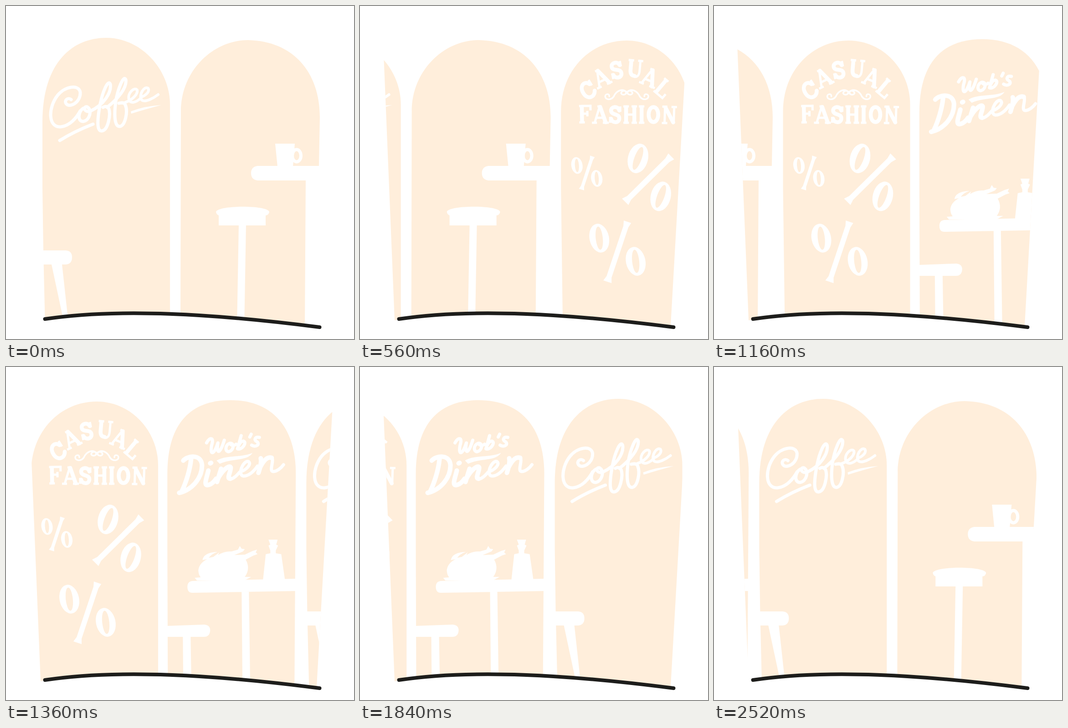
Recreate the animation shown at these times as an HTML page. Size 764x733 px, loop 2560 ms.

```html
<!DOCTYPE html>
<html lang="en">
<head>
<meta charset="utf-8">
<title>Shop windows</title>
<style>
html, body { margin: 0; width: 100%; height: 100%; overflow: hidden; background: #fff; }
svg { display: block; width: 764px; height: 733px; }
.pane { fill: #ffeedb; }
.white { fill: #fff; }
.ink { fill: none; stroke: #fff; stroke-width: 7; stroke-linecap: round; stroke-linejoin: round; }
.ink.bold { stroke-width: 10; }
.ink.heavy { stroke-width: 8.5px; }
.ink.fine { stroke-width: 5px; stroke-linecap: butt; stroke-linejoin: miter; }
</style>
</head>
<body>
<svg viewBox="0 0 764 733">
  <defs>
    <clipPath id="view">
      <path d="M50 60L76 692L85 689C245 665 455 677 688 707L682 704L718.500 60Z"/>
    </clipPath>
    <g id="street">
      <g id="cafe">
        <path class="pane" d="M86 710L82 540L80 400V255C80 122 148 70 220 70C297 70 360 140 360 217V710Z"/>
        <path class="white" d="M78 538H131Q145 539 145 553Q145 568 131 569H78Z M100 569H123L136 688Q132 694 126 691Z"/>
        <g class="ink" role="img" aria-label="Coffee">
          <path d="M143 206C136 200 127 208 132 215C139 225 164 213 163 190C160 172 130 176 113 197C92 224 92 268 120 266C140 264 155 246 163 231"/>
          <path d="M170 225C158 232 156 255 170 254C184 252 190 228 178 222C170 220 170 234 184 232C215 218 232 190 229 172C224 160 212 190 207 215C201 245 198 276 210 275C224 274 230 240 226 227C222 218 215 222 213 223"/>
          <path d="M222 223C245 205 266 180 263 162C258 150 245 185 241 210C237 240 238 266 250 265C262 263 268 232 262 218C260 210 250 214 248 214"/>
          <path stroke-width="6" d="M262 212C275 208 290 195 288 185C282 177 266 192 270 206C274 218 290 210 298 200C308 196 316 188 312 181C304 175 290 196 298 207C306 213 325 202 334 195"/>
          <path d="M118 296Q150 276 191 260"/>
        </g>
        <path class="white" d="M274 232Q305 220 341 218Q310 226 275 237Z"/>
      </g>

      <g id="bar">
        <path class="pane" d="M383 710L384 232C384 142 455 75 531 75C630 77 689 145 689 245L687 352L658 384L656 710Z"/>
        <path class="white" d="M552 352H692V384H552Q538 382 538 368Q538 354 552 352Z M591 303H634L630 353H596Z"/>
        <ellipse class="ink" cx="638" cy="329.500" rx="9.500" ry="13.500"/>
        <path class="white" d="M461 453C466 438 574 438 578 453Q577 460 570 461V483H467V461Q462 459 461 453Z M511 480H527L523 710H507Z"/>
      </g>

      <g id="fashion" transform="translate(405.600)">
        <path class="pane" d="M310 710L306 400V232C306 140 372 76 450 76C525 76 585 140 585 217V710Z"/>
        <g id="sign" role="img" aria-label="Casual fashion"></g>
        <path id="curl" class="ink" style="stroke-width:3.5px" d="M412 199C413 192 403 193 403 199C404 208 417 207 422 199C428 185 442 182 448 188C453 195 440 198 438 192C440 184 450 186 453 193"/>
        <use href="#curl" transform="matrix(-1 0 0 1 901 0)"/>
        <g id="percents"></g>
      </g>

      <g id="diner" transform="translate(733.900)">
        <path class="pane" d="M278 710L277 400V235C277 122 330 73 415 73C505 73 559 130 559 235L556 710Z"/>
        <g class="ink" role="img" aria-label="Wob's Diner">
          <path d="M363 167C371 152 380 156 374 173C370 196 380 193 388 167C384 192 392 194 402 161"/>
          <path d="M414 168C402 172 404 189 413 186C424 182 424 166 414 168Q420 176 428 170"/>
          <path d="M439 151L431 180C440 184 453 166 444 163Q438 163 434 172"/>
          <path d="M461 148L458 154M479 155C470 153 466 160 473 164C482 170 471 178 462 172"/>
          <path class="ink bold" d="M312 206C320 196 350 190 353 215C354 245 330 271 303 277M329 203C327 225 318 255 308 275"/>
          <path class="ink bold" d="M367 228C364 242 356 260 365 260C374 259 380 252 384 246M371 212L373 211"/>
          <path class="ink bold" d="M395 224L386 253M388 246C396 230 412 214 416 221C417 230 406 246 415 246"/>
          <path d="M415 247C424 245 430 238 436 231C450 227 463 214 455 208C443 205 430 238 444 240C457 240 468 228 475 218"/>
          <path class="ink bold" d="M482 201C485 210 480 222 477 233M480 222C487 208 496 196 506 200"/>
          <path d="M507 200C511 208 500 229 509 230C518 230 527 222 532 215"/>
        </g>
        <path class="white" d="M385 206C405 193 440 200 464 189C452 208 420 200 392 213Z"/>
        <path class="white" d="M332 471L562 466V493L332 497Q321 497 321 484Q321 472 332 471Z M440 494H456L459 710H442Z M275 570L358 567Q371 568 371 580Q370 594 357 594H275Z M311 592H328L330 710H312Z"/>
        <path class="white" d="M337 464L350 463Q345 456 345 447Q347 432 364 423L354 425Q357 408 387 407Q373 412 368 420L378 418Q386 412 391 408L388 414Q402 405 418 406L432 402L436 394L440 400L447 401L443 406L424 414L447 413L464 405L474 402L471 408L475 412L466 415L449 424Q460 444 447 462L461 462L446 470H342Z"/>
        <path class="white" d="M499 380H519L516 391L520 393L515 404V410L527 412L535 468H487L493 412L503 410V404L499 393L503 391Z"/>
      </g>
    </g>
  </defs>

  <g clip-path="url(#view)">
    <g id="belt">
      <use href="#street"/>
      <use href="#street" x="1236"/>
    </g>
  </g>
  <path d="M85.500 689C245 665 455 677 688.500 707" fill="none" stroke="#1d1d1b" stroke-width="8" stroke-linecap="round"/>
</svg>
<script>
const LOOP = 2560, STEP = 40, PERIOD = 1236;
const byId = id => document.getElementById(id);

// Slab letters centred on 0,0: heavy strokes, then fine strokes
const glyphs = {
  A: ['M0 -17L12 17', 'M-1 -18L-12 18M-9 7H9M-18 18H-7M6 18H19M-6 -18H3'],
  C: ['M10 -9C5 -22 -12 -18 -12 1C-12 20 6 21 12 9', 'M13 -18V-4'],
  F: ['M-7 -16V16', 'M-13 -18H12V-8M-7 -1H6M5 -7V5M-13 18H-1'],
  H: ['M-9 -16V16M9 -16V16', 'M-15 -18H-3M3 -18H15M-15 18H-3M3 18H15M-9 0H9'],
  I: ['M0 -16V16', 'M-6 -18H6M-6 18H6'],
  L: ['M-7 -16V16', 'M-13 -18H-1M-13 18H12V7'],
  N: ['M-9 -16L9 16', 'M-10 -18V18M10 -18V18M-16 -18H-5M4 -18H16M-16 18H-4'],
  O: ['M0 -16.500C-14 -16 -14 16 0 16.500C14 16 14 -16 0 -16.500', ''],
  S: ['M9 -9C6 -20 -9 -18 -9 -9C-9 2 9 -3 9 8C9 20 -7 19 -9 9', 'M11 -18V-6M-11 5V18'],
  U: ['M-10 -16V3C-10 13 -6 16 0 16', 'M0 18C8 18 10 12 10 3V-18M-16 -18H-4M5 -18H16']
};

function letter(char, x, y, angle) {
  const [heavy, fine] = glyphs[char];
  return `<g transform="translate(${x} ${y}) rotate(${angle})">
    <path class="ink heavy" d="${heavy}"/><path class="ink fine" d="${fine}"/></g>`;
}

function zero(x, y, size, angle) {
  return `<g transform="translate(${x} ${y}) rotate(${angle}) scale(${size})">
    <ellipse class="white" rx="22" ry="33"/>
    <ellipse class="pane" rx="8" ry="26.500" transform="rotate(6)"/></g>`;
}

// Bar with flared ends
function slash(x1, y1, x2, y2, size) {
  const angle = Math.atan2(y2 - y1, x2 - x1) * 180 / Math.PI;
  const h = Math.hypot(x2 - x1, y2 - y1) / 2, s = size;
  const d = `M${-h} ${-9 * s}L${12 * s - h} ${-6 * s}H${h - 12 * s}L${h} ${-10 * s}V${10 * s}` +
    `L${h - 12 * s} ${6 * s}H${12 * s - h}L${-h} ${9 * s}Z`;
  return `<path class="white" d="${d}" transform="translate(${(x1 + x2) / 2} ${(y1 + y2) / 2}) rotate(${angle})"/>`;
}

byId('sign').innerHTML = [
  ['C', 365, 185, -32], ['A', 394, 158, -25], ['S', 428, 141, -12],
  ['U', 469, 138, 5], ['A', 501, 157, 22], ['L', 531, 181, 40],
  ['F', 359, 238, -1], ['A', 392, 239, 0], ['S', 425, 239, 0], ['H', 458, 239, 0],
  ['I', 483, 239, 0], ['O', 509, 239, 0], ['N', 544, 240, 2]
].map(args => letter(...args)).join('');

byId('percents').innerHTML =
  zero(341, 351, .56, -10) + slash(375, 331, 351, 404, .6) + zero(384.5, 379.5, .56, -10) +
  zero(475, 335.5, 1, 14) + slash(548, 331, 447, 431, 1) + zero(525, 419, 1, 14) +
  zero(390, 511, .97, -12) + slash(452, 475, 408, 607, .95) + zero(470, 562, .97, -12);

const belt = byId('belt');
function draw(now) {
  const time = Math.floor(now % LOOP / STEP) * STEP;
  belt.setAttribute('transform', `translate(${-PERIOD * time / LOOP})`);
}

const start = performance.now();
function tick() {
  draw(performance.now() - start);
  requestAnimationFrame(tick);
}
tick();
</script>
</body>
</html>
```
